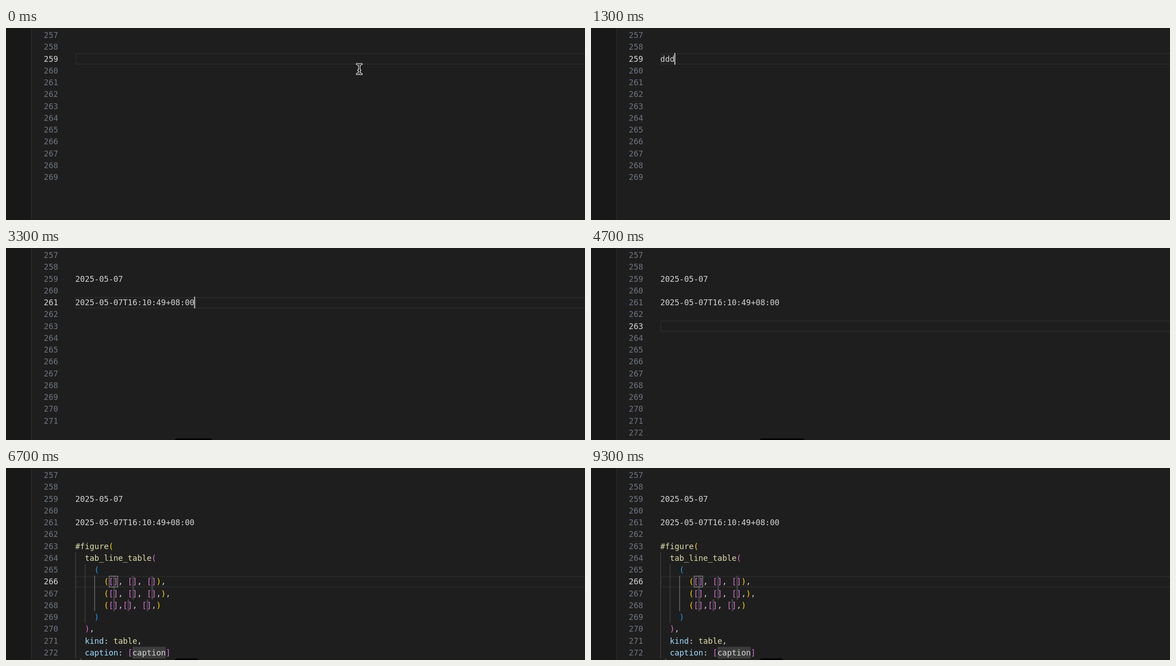
Animation, 1280 px wide and 426 px high, one loop 9500 ms. Source, as an HTML page with a canvas:

```html
<!DOCTYPE html>
<html lang="en">
<head>
<meta charset="utf-8">
<title>Snippet completion</title>
<style>
  html, body { margin: 0; width: 100%; height: 100%; overflow: hidden; background: #1e1e1e; }
  canvas { display: block; }
</style>
</head>
<body>
<canvas id="stage" width="1280" height="426"></canvas>
<script>
const ctx = document.getElementById('stage').getContext('2d');
const LOOP = 9500;
const LEFT = 153.2, CHAR = 10.53, ROW = 26.25, FIRST = 257, TOP = 2.75;
const MONO = '"DejaVu Sans Mono", "Noto Sans CJK SC", "Noto Sans CJK", monospace';
const CODE = '17.5px ' + MONO, BOLD = 'bold ' + CODE, NOTE = '14.9px ' + MONO;
const BRACKETS = ['#ffd700', '#da70d6', '#179fff'];

const DATE = '2025-05-07', STAMP = '2025-05-07T16:10:49+08:00';
const D_ITEMS = [
  ['day', 'Current flag number'], ['ddd'], ['ddt'], ['dm'], ['dtt'],
  ['dprod', 'Write a double product', true], ['dsum', 'Write a double sum', true]
];
const TABLE_ITEM = [['table-3', '三线学术表']];
const FIGURE = [
  '#figure(',
  '  tab_line_table(',
  '    (',
  '      ([], [], []),',
  '      ([], [], [],),',
  '      ([],[], [],)',
  '    )',
  '  ),',
  '  kind: table,',
  '  caption: [caption]'
];

// Each step: start time, text from line 259 on, completion list, start of the caret blink
const STEPS = [
  { at: 0, text: [''], since: -600 },
  { at: 100, text: ['d'], list: D_ITEMS },
  { at: 800, text: ['dd'], list: [['ddd'], ['ddt']] },
  { at: 1000, text: ['ddd'], list: [['ddd']] },
  { at: 1300, text: ['ddd'] },
  { at: 1400, text: [DATE] },
  { at: 1900, text: [DATE, ''] },
  { at: 2300, text: [DATE, '', ''] },
  { at: 2700, text: [DATE, '', 'd'], list: D_ITEMS },
  { at: 2900, text: [DATE, '', 'dd'], list: [['ddd'], ['ddt']] },
  { at: 3200, text: [DATE, '', 'ddt'], list: [['ddt']] },
  { at: 3300, text: [DATE, '', STAMP], since: 3200 },
  { at: 4000, text: [DATE, '', STAMP, ''] },
  { at: 4200, text: [DATE, '', STAMP, '', ''] },
  { at: 5000, text: [DATE, '', STAMP, '', 't'], list: TABLE_ITEM },
  { at: 5100, text: [DATE, '', STAMP, '', 'ta'], list: TABLE_ITEM },
  { at: 5200, text: [DATE, '', STAMP, '', 'tab'], list: TABLE_ITEM },
  { at: 5800, text: [DATE, '', STAMP, ''], figure: true }
];
// Right end of the dark tab at the lower edge
const TAB_ENDS = [[0, 0], [1900, 454], [4000, 470], [5100, 437], [5800, 423]];

const rowTop = n => TOP + (n - FIRST) * ROW;
const colX = c => LEFT + c * CHAR;

function rect(x, y, w, h, color) {
  ctx.fillStyle = color;
  ctx.fillRect(x, y, w, h);
}

function write(text, x, y, color, font = CODE, align = 'left') {
  ctx.font = font;
  ctx.fillStyle = color;
  ctx.textAlign = align;
  ctx.fillText(text, x, y);
}

function lineText(n, text, col = 0, color = '#d4d4d4') {
  write(text, colX(col), rowTop(n) + 19.4, color);
}

function drawEditor(active, last) {
  rect(0, 0, 1280, 426, '#1e1e1e');
  rect(0, 0, 56, 426, '#181818');
  rect(55.5, 0, 1.5, 426, '#2b2b2b');
  const y = Math.round(rowTop(active));
  ctx.strokeStyle = '#282828';
  ctx.lineWidth = 2.5;
  ctx.strokeRect(154.7, y + 1.9, 1140, 23);
  for (let n = FIRST; n <= last; n++) {
    write(n, 83.6, rowTop(n) + 19.4, n === active ? '#d6d6d6' : '#6e7681');
  }
}

function drawCaret(line, col) {
  rect(colX(col) - 0.8, rowTop(line) + 0.2, 2.6, 26, '#aeafad');
}

function drawFigure() {
  const start = 263;
  const guide = (col, from, to, color) =>
    rect(colX(col) - 0.2, rowTop(from), 1.5, (to - from + 1) * ROW, color);
  guide(0, 264, 272, '#404040');
  guide(2, 265, 269, '#404040');
  guide(4, 266, 268, '#707070');

  const stop = (line, col) => rect(colX(col) - 0.3, rowTop(line), 3.6, ROW, '#424242');
  rect(colX(12), rowTop(272) + 0.2, 7 * CHAR, 26, '#3c3c3c');
  stop(273, 1);

  let depth = 0;
  FIGURE.forEach((src, i) => {
    const line = start + i;
    for (const m of src.matchAll(/[\w#]+|\S/g)) {
      const [token] = m;
      let color = '#d4d4d4';
      if ('(['.includes(token)) color = BRACKETS[depth++ % 3];
      else if (')]'.includes(token)) color = BRACKETS[--depth % 3];
      else if (/\w/.test(token)) {
        if (src[m.index + token.length] === ':') color = '#9cdcfe';
        else if (src[m.index - 1] !== '[') color = '#dcdcaa';
      }
      if (token === ']' && src[m.index - 1] === '[') stop(line, m.index);
      lineText(line, token, m.index, color);
    }
  });
  ctx.strokeStyle = '#888888';
  ctx.lineWidth = 1.5;
  ctx.strokeRect(228.2, rowTop(266) + 1, 18.6, 24.2);
}

function drawWrench(x, y, color) {
  ctx.save();
  ctx.translate(x, y);
  ctx.rotate(-Math.PI / 4);
  ctx.beginPath();
  ctx.moveTo(12.3, -2.3);
  ctx.lineTo(7.2, -2.3);
  ctx.lineTo(5.8, 0);
  ctx.lineTo(7.2, 2.3);
  ctx.lineTo(12.3, 2.3);
  ctx.arc(6.8, 0, 6, 0.4, 2.65);
  ctx.lineTo(-9.3, 2.7);
  ctx.arc(-9.3, 0, 2.7, Math.PI / 2, Math.PI * 1.5);
  ctx.lineTo(1.5, -2.7);
  ctx.arc(6.8, 0, 6, -2.65, -0.4);
  ctx.closePath();
  ctx.strokeStyle = color;
  ctx.lineWidth = 1.5;
  ctx.lineJoin = 'round';
  ctx.stroke();
  ctx.restore();
}

function drawFrameIcon(x, y) {
  ctx.strokeStyle = '#cccccc';
  ctx.lineWidth = 1.5;
  ctx.beginPath();
  ctx.moveTo(x - 8.5, y + 7);
  ctx.lineTo(x - 8.5, y - 9);
  ctx.lineTo(x + 8.5, y - 9);
  ctx.lineTo(x + 8.5, y + 7);
  ctx.stroke();
  for (let i = 0; i < 7; i++) rect(x - 9.2 + i * 2.83, y + 8, 1.5, 1.5, '#cccccc');
}

function drawList(line, typed, items) {
  const x = colX(typed.length) + 0.4, y = rowTop(line + 1) + 0.2;
  const w = 628.5, h = items.length * ROW + 4.4;
  ctx.save();
  ctx.beginPath();
  ctx.roundRect(x, y, w, h, 4);
  ctx.fillStyle = '#202020';
  ctx.fill();
  ctx.clip();
  rect(x, y, w, ROW + 1, '#04395e');
  ctx.restore();
  ctx.strokeStyle = '#454545';
  ctx.lineWidth = 1.3;
  ctx.stroke();
  items.forEach(([label, note, framed], i) => {
    const top = y + 0.9 + i * ROW, mid = top + 13.2, base = top + 19.4;
    const picked = i === 0;
    if (framed) drawFrameIcon(x + 16, mid);
    else drawWrench(x + 16, mid, picked ? '#ffffff' : '#cccccc');
    write(typed, x + 33, base, picked ? '#40a6ff' : '#2aaaff', BOLD);
    write(label.slice(typed.length), x + 33 + typed.length * CHAR, base, picked ? '#ffffff' : '#d0d0d0');
    if (note) write(note, x + 613, top + 18.6, picked ? '#c8d3dc' : '#9d9d9d', NOTE, 'right');
  });
}

function drawPointer(x, y) {
  ctx.beginPath();
  for (const s of [-1, 1]) {
    ctx.moveTo(x - 5, y + s * 11);
    ctx.quadraticCurveTo(x, y + s * 11, x, y + s * 7);
    ctx.quadraticCurveTo(x, y + s * 11, x + 5, y + s * 11);
  }
  ctx.moveTo(x, y - 8);
  ctx.lineTo(x, y + 8);
  ctx.moveTo(x - 2, y + 3);
  ctx.lineTo(x + 2, y + 3);
  ctx.lineCap = 'round';
  ctx.lineJoin = 'round';
  for (const [width, color] of [[4.6, '#ffffff'], [2, '#111111']]) {
    ctx.lineWidth = width;
    ctx.strokeStyle = color;
    ctx.stroke();
  }
  ctx.lineCap = 'butt';
  ctx.lineJoin = 'miter';
}

function drawTab(t) {
  const end = TAB_ENDS.filter(([at]) => at <= t).pop()[1];
  if (!end) return;
  ctx.beginPath();
  ctx.roundRect(367, 422.6, end + 8 - 367, 40, 14);
  ctx.fillStyle = '#000000';
  ctx.fill();
}

function draw(t) {
  const step = STEPS.filter(s => s.at <= t).pop();
  const line = 258 + step.text.length;
  const typed = step.text[step.text.length - 1];
  const active = step.figure ? 266 : line;
  drawEditor(active, Math.min(272, 269 + line - 259));
  step.text.forEach((text, i) => lineText(259 + i, text));
  if (step.figure) drawFigure();
  const caretOn = (t - (step.since ?? step.at)) % 1000 < 500;
  if (caretOn) drawCaret(active, step.figure ? 8 : typed.length);
  if (step.list) drawList(line, typed, step.list);
  drawTab(t);
  if (t < 100) drawPointer(781, 91);
}

const began = performance.now();
function tick() {
  draw((performance.now() - began) % LOOP);
  requestAnimationFrame(tick);
}
tick();
</script>
</body>
</html>
```
